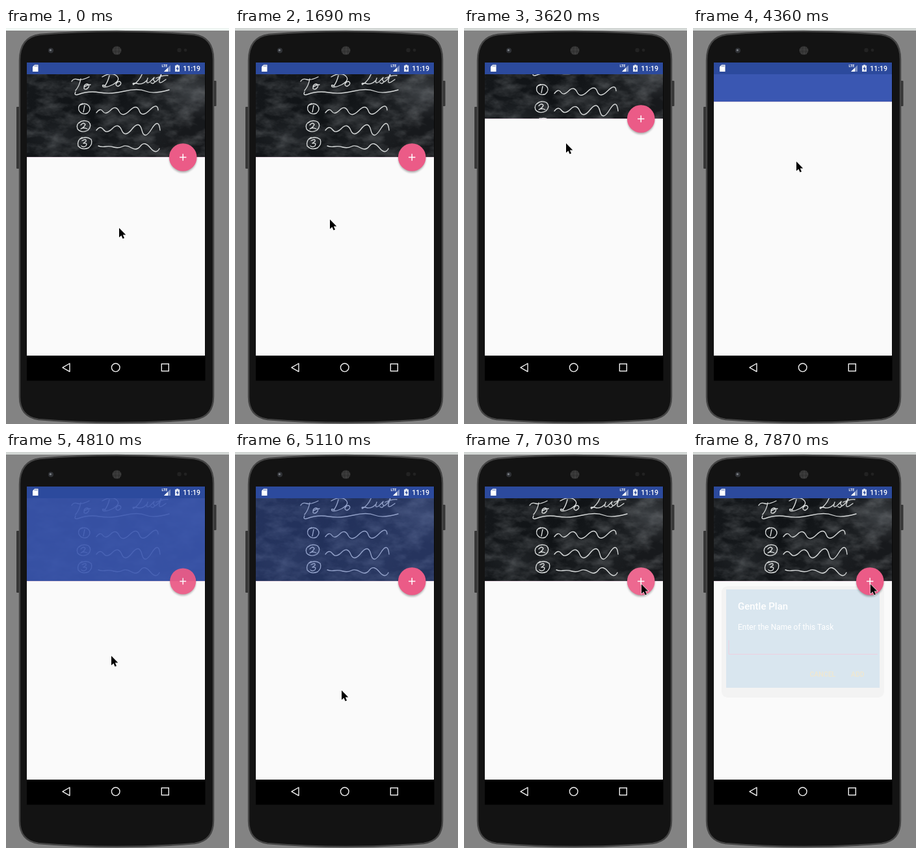
An HTML page that plays this animation: 343x608 px, repeating every 8 s.

```html
<!DOCTYPE html>
<html lang="en">
<head>
<meta charset="utf-8">
<title>Collapsing header</title>
<style>
html, body { margin: 0; width: 100%; height: 100%; overflow: hidden; background: #838383; }
svg { display: block; width: 100vw; height: 100vh; }
text { font-family: Roboto, sans-serif; fill: #fff; }
.med { font-weight: 500; }
.chalk { fill: none; stroke: #d9dcdc; stroke-width: 1.35; stroke-linecap: round; stroke-linejoin: round; }
.nav { fill: none; stroke: #f2f2f2; stroke-width: 1.4; }
</style>
</head>
<body>
<svg viewBox="0 0 343 608" xmlns="http://www.w3.org/2000/svg">
  <defs>
    <clipPath id="headClip"><rect id="headRect" x="32" y="71" width="274" height="127.5"/></clipPath>
    <linearGradient id="board" x2="1" y2=".35">
      <stop offset="0" stop-color="#15181b"/>
      <stop offset=".5" stop-color="#101316"/>
      <stop offset=".85" stop-color="#1c1f22"/>
      <stop offset="1" stop-color="#17191c"/>
    </linearGradient>
    <radialGradient id="smear">
      <stop offset="0" stop-color="#9aa0a6" stop-opacity=".28"/>
      <stop offset="1" stop-color="#9aa0a6" stop-opacity="0"/>
    </radialGradient>
    <pattern id="mesh" width="2.4" height="2.4" patternUnits="userSpaceOnUse">
      <circle cx="1.2" cy="1.2" r=".75" fill="#666"/>
    </pattern>
    <filter id="dust" x="0" y="0" width="1" height="1">
      <feTurbulence type="fractalNoise" baseFrequency=".035 .06" numOctaves="4" seed="7"/>
      <feColorMatrix values="0 0 0 0 .65  0 0 0 0 .68  0 0 0 0 .7  .5 0 0 0 -.19"/>
    </filter>
    <filter id="blur" x="-30%" y="-30%" width="160%" height="160%"><feGaussianBlur stdDeviation="1.8"/></filter>
  </defs>

  <!-- device -->
  <rect width="343" height="608" fill="#838383"/>
  <rect id="strip" width="343" height="4"/>
  <rect x="16" y="121" width="5" height="95" rx="1" fill="#363636"/>
  <rect x="319" y="81" width="4.5" height="39" rx="1" fill="#363636"/>
  <path d="M21 50Q21 14 52 10Q170 0 289 10Q319 14 319 48V566Q319 597 290 601Q170 611 50 601Q21 597 21 566Z"
    fill="#131313" stroke="#444" stroke-width="2.4"/>
  <circle cx="69" cy="34.5" r="4" fill="#303236"/>
  <circle cx="68.4" cy="34" r="1.6" fill="#7d8288"/>
  <circle cx="170.5" cy="34.5" r="7" fill="#222"/>
  <circle cx="170.5" cy="34.5" r="6.6" fill="url(#mesh)"/>
  <g fill="#222"><circle cx="266.500" cy="34" r="3.2"/><circle cx="276" cy="34" r="2.4"/></g>

  <!-- screen -->
  <rect x="32" y="53" width="274.500" height="488.500" fill="#000"/>
  <rect x="32" y="71" width="274" height="432" fill="#fafafa"/>
  <g clip-path="url(#headClip)">
    <g id="photo">
      <rect x="32" y="71" width="274" height="128" fill="url(#board)"/>
      <rect x="32" y="71" width="274" height="128" filter="url(#dust)"/>
      <ellipse cx="288" cy="100" rx="48" ry="40" fill="url(#smear)"/>
      <ellipse cx="82" cy="165" rx="60" ry="35" fill="url(#smear)" opacity=".4"/>
      <g class="chalk">
        <path d="M101 82Q104 77 110 79T128 75M115 78Q113 89 107 96M120 90Q121 86 125 86Q129 87 127 91Q123 96 120 93Q119 90 125 88L130 87"/>
        <path d="M148 75Q160 68 168 72Q179 79 164 87Q154 92 149 90Q147 86 153 89M159 73Q157 82 152 89M169 87Q170 83 174 82Q178 83 176 87Q171 92 169 87"/>
        <path d="M211 66Q207 80 196 87Q193 84 201 85Q209 88 216 81M218 77Q214 87 221 83L228 76Q225 80 229 82Q227 87 223 84M229 83Q237 79 240 66M239 72Q232 87 240 83L246 79M231 77Q242 72 249 73"/>
        <path d="M107 98Q104 104 111 102Q127 96 144 99T182 97T215 97T251 95"/>
        <path d="M118 116Q110 118 112 126Q116 134 125 131Q132 125 127 119Q122 114 115 118M121 119L119 129"/>
        <path d="M116 143Q107 147 110 155Q116 162 126 157Q133 150 127 144Q119 140 112 146M115 149Q119 144 122 148Q121 152 115 155Q120 152 125 155"/>
        <path d="M117 168Q109 172 111 181Q117 188 127 184Q134 178 131 171Q123 165 113 171M117 173Q124 169 123 174L119 177Q126 176 123 181Q119 184 116 181"/>
        <path d="M139 130Q145 122 149 128T161 126T174 128T190 127T205 127T221 126T234 126"/>
        <path d="M139 157Q145 149 150 156T164 154T178 157T194 155T209 157T224 155T237 157"/>
        <path d="M142 181Q147 183 153 182T166 183T179 182T193 184T207 181T222 184T236 185"/>
      </g>
    </g>
    <rect id="scrim" x="32" y="71" width="274" height="128" fill="#3a57b2"/>
  </g>
  <rect id="edge" x="32" width="274" height="1" fill="#e7d6e2"/>

  <!-- status bar -->
  <rect x="32" y="53" width="274" height="18" fill="#2c4a9d"/>
  <path d="M44 56.500H49.500V67H41V59.500Z" fill="#fff"/>
  <path d="M44.300 57.500V59.500M46 57.500V59.500M47.700 57.500V59.500" stroke="#2c4a9d" stroke-width=".7"/>
  <text x="239.500" y="60" font-size="5.400" font-weight="700">LTE</text>
  <path d="M253 57V67H243Z" fill="#8093c5"/>
  <path d="M249 61V67H243Z" fill="#fff"/>
  <path d="M262 57.500V56.500H265V57.500H267V67H260V57.500Z" fill="#e8ecf5"/>
  <path d="M264.300 58.800L261.500 63H263.300V66L266 61.800H264.300Z" fill="#2c4a9d"/>
  <text class="med" x="272.300" y="66" font-size="10.500">11:19</text>

  <!-- navigation bar -->
  <g class="nav">
    <path d="M87 521.300L98 515V527.600Z" stroke-linejoin="round"/>
    <circle cx="168.700" cy="521.300" r="6.300"/>
    <rect x="239.300" y="515.700" width="11" height="11"/>
  </g>

  <!-- dialog -->
  <g id="dialog">
    <rect x="44" y="206" width="250" height="171" rx="9" fill="#f3f3f3"/>
    <rect x="51" y="211" width="236" height="151" fill="#d9e6ef"/>
    <text class="med" x="69" y="242" font-size="15">Gentle Plan</text>
    <text x="69" y="273" font-size="12">Enter the Name of this Task</text>
    <path d="M55 289V310.500H284" fill="none" stroke="#eed0df"/>
    <g class="med" font-size="10.500">
      <text x="179.500" y="345" style="fill:#f0e7cf">CANCEL</text>
      <text x="243" y="345" style="fill:#f0e7cf">ADD</text>
    </g>
  </g>

  <!-- floating button, centred on its own origin -->
  <g id="fab">
    <circle cy="2.500" r="21" fill="#000" opacity=".3" filter="url(#blur)"/>
    <circle r="21.300" fill="#eb5b87"/>
    <circle id="ripple" r="21.300" fill="#fff" opacity=".08"/>
    <path d="M-5.200 0H5.200M0 -5.200V5.200" stroke="#fff" stroke-width="1.500"/>
  </g>

  <path id="cursor" d="M0 0V14.500L3.400 11.400L5.600 16.500L8 15.400L5.800 10.500H10.300Z"
    fill="#000" stroke="#fff" stroke-width="1.100" paint-order="stroke"/>
</svg>
<script>
const LOOP = 8000, OPEN = 198;
const $ = id => document.getElementById(id);

// bursts of movement: start, end, number of steps
const bursts = [[150, 1110, 8], [1250, 1690, 4], [2290, 3330, 8], [3480, 3770, 3],
  [4060, 4960, 7], [5110, 6140, 8]];

const cursorKeys = [[0, 174, 307], [149, 174, 307], [290, 170, 325], [560, 162, 353], [1110, 147, 213],
  [1690, 146, 294], [2150, 146, 294], [2730, 152, 200], [3180, 158, 361], [3330, 158, 275],
  [3480, 157, 245], [3625, 157, 177], [3770, 156, 140], [3920, 156, 140], [4360, 159, 205],
  [4660, 161, 270], [4810, 162, 313], [4960, 163, 345], [5110, 164, 366], [5260, 166, 371], [6140, 273, 203]];
const heightKeys = [[2290, OPEN], [2590, 150], [2730, 139], [2880, 146], [3180, OPEN], [3330, OPEN],
  [3480, 185], [3625, 139], [3770, 113], [4360, 113], [4510, 128], [4660, 165], [4810, OPEN]];
const scrimKeys = [[3640, 0], [3770, 1], [4720, 1], [4810, .9], [5110, .44], [5400, 0]];
const fabKeys = [[3640, 1], [3770, 0], [4600, 0], [4810, .94], [4960, 1]];

function snap(t) {
  let out = 0;
  for (const [a, b, n] of bursts) {
    if (t < a) break;
    const gap = (b - a) / (n - 1);
    out = Math.min(b, a + Math.floor((t - a) / gap + .05) * gap);
  }
  return out;
}

function at(keys, t, col = 1) {
  if (t <= keys[0][0]) return keys[0][col];
  const i = keys.findIndex(k => k[0] > t);
  if (i < 0) return keys[keys.length - 1][col];
  const a = keys[i - 1], b = keys[i];
  return a[col] + (b[col] - a[col]) * (t - a[0]) / (b[0] - a[0]);
}

function draw(t) {
  const s = snap(t), h = at(heightKeys, s), k = at(fabKeys, s);
  $('strip').setAttribute('fill', t < 150 ? '#eff5f2' : '#d3d7d5');
  $('headRect').setAttribute('height', h - 71 + .3);
  $('edge').setAttribute('y', h);
  $('photo').setAttribute('transform', `translate(0 ${(h - OPEN) / 2})`);
  $('scrim').setAttribute('opacity', at(scrimKeys, s));
  $('fab').setAttribute('transform', `translate(272.200 ${h + .5}) scale(${k})`);
  $('fab').setAttribute('opacity', k);
  $('cursor').setAttribute('transform', `translate(${at(cursorKeys, s)} ${at(cursorKeys, s, 2)})`);
  $('ripple').style.display = t >= 7030 && t < 7870 ? '' : 'none';
  $('dialog').style.display = t >= 7870 ? '' : 'none';
}

const start = performance.now();
function tick() {
  draw((performance.now() - start) % LOOP);
  requestAnimationFrame(tick);
}
tick();
</script>
</body>
</html>
```
